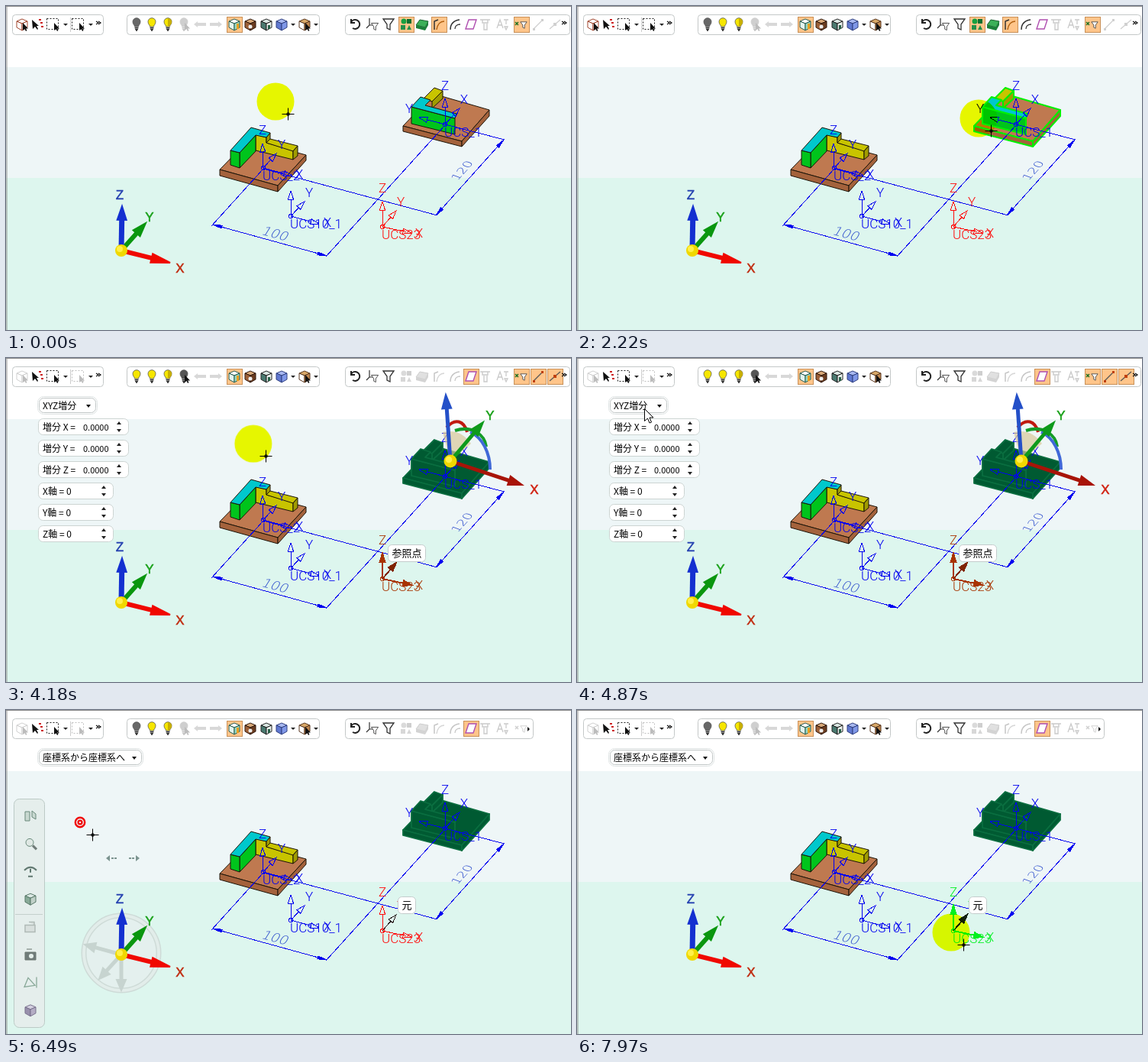
Write an HTML page that moves like this. It is 740x424 px and loops after 8000 ms.

```html
<!DOCTYPE html>
<html lang="ja">
<head>
<meta charset="utf-8">
<style>
html, body { margin: 0; width: 740px; height: 424px; overflow: hidden; background: #fff; }
svg { display: block; }
text { font-family: "Noto Sans CJK JP", "Noto Sans CJK", "Noto Sans", sans-serif; font-size: 12px; white-space: pre; }
.cad text { font-family: Roboto, "Liberation Sans", sans-serif; font-size: 17px; font-weight: 300; stroke: none; }
.cad path, .cad circle { shape-rendering: crispEdges; }
.dim { font-family: "DejaVu Sans", sans-serif !important; }
.axis { font-family: "Liberation Sans", sans-serif; font-size: 17px; }
.off { filter: grayscale(1); opacity: .28; }
#pointer { mix-blend-mode: multiply; }
</style>
</head>
<body>
<svg width="740" height="424" viewBox="0 0 740 424">
  <rect width="740" height="424" fill="#fff"/>
  <rect y="80" width="740" height="145" fill="#eef6f7"/>
  <rect y="225" width="740" height="199" fill="#ddf6ee"/>
  <path d="M0 .5H740M1 0V424" stroke="#8c8c8c" fill="none"/>
  <g id="tools"></g>
  <g id="compass"></g>
  <g id="parts"></g>
  <g id="dims" class="cad"></g>
  <g id="frames" class="cad"></g>
  <g id="origin" class="cad"></g>
  <g id="triad"></g>
  <g id="gizmo"></g>
  <g id="tip"></g>
  <g id="panel"></g>
  <g id="menu"></g>
  <circle id="pointer" r="24.5" fill="#f7ff00"/>
  <g id="ring" fill="none" stroke="#f00000" stroke-width="2.4"><circle r="6.2"/><circle r="2.4"/></g>
  <path id="cross" d="M8 16H24M16 8V24M14.5 14.5h3v3h-3z" fill="none" stroke="#000"/>
  <path id="arrow" d="M0 0V16L4 12.5L6.5 18.5L9 17.5L6.5 11.5H11.5Z" fill="#fff" stroke="#000"/>
</svg>
<script>
const LOOP = 8000, BLUE = '#0000f0';
const $ = id => document.getElementById(id);
const shown = {};
function put(id, html) {
  if (shown[id] !== html) $(id).innerHTML = shown[id] = html;
}

const path = (d, fill = 'none', stroke = 'none', w = 1) =>
  `<path d="${d}" fill="${fill}" stroke="${stroke}" stroke-width="${w}"/>`;
const box = (x, y, w, h, r, fill, stroke) =>
  `<rect x="${x + .5}" y="${y + .5}" width="${w}" height="${h}" rx="${r}" fill="${fill}" stroke="${stroke}"/>`;
const text = (x, y, s, extra = '') => `<text x="${x}" y="${y}" ${extra}>${s}</text>`;
const disc = (x, y, r, fill, stroke = 'none') =>
  `<circle cx="${x}" cy="${y}" r="${r}" fill="${fill}" stroke="${stroke}"/>`;

// Toolbar glyphs, drawn around their own centre
const mouse = path('M1 -2V8L3.5 6L5 9L6.5 8L5 5.5H8Z', '#111');
const cube = (top, left, right, line) =>
  path('M-7 -4L0 -7L7 -4L0 -1Z', top, line) + path('M-7 -4L0 -1V8L-7 4Z', left, line) + path('M7 -4L0 -1V8L7 4Z', right, line);
const bulb = c => path('M-2.5 3C-2.5 1 -5 0 -5 -3.5A5 4.8 0 0 1 5 -3.5C5 0 2.5 1 2.5 3Z', c, '#555', .8) + path('M-2.5 4.5H2.5M-2 6.5H2M-1 8H1', 'none', '#333', 1.3);
const dashed = '<rect x="-8.500" y="-7.500" width="15" height="14" fill="none" stroke="#222" stroke-dasharray="2 2"/>';
const funnel = path('M-7 -7H7L2 0V7L-2 5V0Z', '#fff', '#333', 1.3);
const drop = path('M-3 -1H3L0 2Z', '#222');
const more = path('M-3 -4L0 -2L-3 0M0 -4L3 -2L0 0', 'none', '#111', 1.2);
const curve = path('M-6 7C-6 -2 -1 -5 6 -6', 'none', '#333', 1.5);
const glyph = {
  pick: cube('#fff', '#fff', '#fff', '#a0442c') + mouse,
  points: path('M-7 -6L-6 6L-3 3L0 7L1 6L-1 2H2Z', '#111') + path('M2 -6h3M4 -2h3M5 3h3', 'none', '#c22', 2),
  region: dashed + mouse, drop, more,
  dark: bulb('#686868'), lit: bulb('#f6e600'), half: bulb('#f6e600') + path('M0 -8A5 5 0 0 1 5 -3C5 0 2 1 2 3H0Z', '#c9b000'),
  bulbPick: bulb('#555') + mouse,
  back: path('M-8 0L-3 -4V-2H8V2H-3V4Z', '#777'), next: path('M8 0L3 -4V-2H-8V2H3V4Z', '#777'),
  solid: cube('#fff', '#e4f5ee', '#9ad8c0', '#285c50') + path('M3 -1H6V6H3Z', '#e8a020'),
  brown: cube('#d8a878', '#9c6038', '#6a3c20', '#30180c') + disc(0, 3, 2.5, '#eee'),
  door: cube('#dce8e4', '#4a7a70', '#e8eeec', '#222') + path('M2 1H5V6H2Z', '#286048'),
  blue: cube('#a8b8f0', '#6078d0', '#8098e8', '#304080'),
  cubePick: cube('#d8a868', '#fff', '#c08850', '#5a3820') + mouse,
  redo: path('M-5 -3A6 6 0 1 1 -3 5M-5 -7V-2H0', 'none', '#222', 2),
  axes: path('M-4 -8V1H4M-4 1L-8 5', 'none', '#333', 1.2) + `<g transform="translate(3 3) scale(.65)">${funnel}</g>`,
  funnel,
  shapes: disc(-3, -4, 3.5, '#18a040') + path('M1 -7H7V-1H1Z', '#0c7030') + path('M-7 1H-1V7H-7ZM1 7L4 1L7 7Z', '#24904a'),
  face: path('M-8 1L-3 -6L8 -4L4 4Z', '#3cb058', '#1c6030') + path('M-8 1L4 4V8L-8 5ZM4 4L8 -4V1L4 8Z', '#1c803a'),
  edge: path('M-6 7V-4L-1 -6', 'none', '#333', 1.5) + path('M-3 7C-2 0 2 -4 7 -4', 'none', '#b06010', 1.5),
  curve: curve + path('M0 6C0 2 3 0 7 0', 'none', '#333', 1.3),
  plane: path('M-7 6L-3 -6H7L3 6Z', '#fff', '#b050b0', 1.4),
  filter: path('M-7 -6H6M-4 -6V-2H3V-6M-2 -1V7H2V-1', 'none', '#444', 1.4),
  letter: path('M-7 5L-3 -6L1 5M-5 1H-1M2 -6H8M5 -6V0M3 3H7L5 7Z', 'none', '#444', 1.3),
  pointX: path('M-8 -3L-4 1M-4 -3L-8 1', 'none', '#207020', 1.5) + `<g transform="translate(3 1) scale(.6)">${funnel}</g>`,
  line: path('M-6 6L6 -6', 'none', '#555', 1.3) + path('M-7 5h3v3h-3zM4 -7h3v3h-3z', '#c04010'),
  mid: path('M-7 6L7 -6', 'none', '#555', 1.3) + path('M-2 -2h4v4h-4z', '#c04010'),
  tail: path('M-1 -2L2 1L-1 4Z', '#111')
};
const icon = (name, x, mode = '') =>
  (mode === 'on' ? box(x - 10, 14, 20, 20, 0, '#ffc58a', '#c89058') : '') +
  `<g transform="translate(${x} 24)"${mode === 'off' ? ' class="off"' : ''}>${glyph[name]}</g>`;

function toolbar(s) {
  const bar = (x, w) => box(x, 11, w, 26, 4, '#fff', '#c4c8c8');
  const free = s < 3 ? '' : 'off', last = s === 4;
  const list = [
    ['pick', 21, free], ['points', 41], ['region', 62], ['drop', 78], ['region', 95, free], ['drop', 111], ['more', 121],
    [s === 3 ? 'lit' : 'dark', 171], ['lit', 191], ['half', 212], ['bulbPick', 233, s > 0 && s < 4 ? '' : 'off'],
    ['back', 254, 'off'], ['next', 275, 'off'], ['solid', 299, 'on'], ['brown', 320], ['door', 341], ['blue', 361],
    ['drop', 376], ['cubePick', 391], ['drop', 406],
    ['redo', 457], ['axes', 480], ['funnel', 501], ['shapes', 524, s < 3 ? 'on' : 'off'], ['face', 545, s < 2 ? '' : 'off'],
    ['edge', 567, s < 3 ? 'on' : 'off'], ['curve', 588, free], ['plane', 609, s < 3 ? '' : 'on'],
    ['filter', 628, 'off'], ['letter', 650, 'off'], ['pointX', 675, last ? 'off' : 'on']
  ];
  if (last) list.push(['tail', 684]);
  else list.push(['line', 697, s === 3 ? 'on' : 'off'], ['mid', 719, s === 3 ? 'on' : 'off'], ['more', 731]);
  return bar(8, 119) + bar(158, 252) + bar(444, last ? 246 : 294) +
    path('M84.500 15V34', 'none', '#ccc') + list.map(i => icon(...i)).join('');
}

// Each face: colour key and outline
const leftPart = [
  ['brown', 'M280 214L318 175L393 195L356 235Z'], ['dark', 'M280 214L356 235V243L280 222Z'], ['dark', 'M356 235L393 195V202L356 243Z'],
  ['yellow', 'M327 168L341 172V179L376 189V201L327 189Z'], ['yellow', 'M341 179L346 174L382 183L376 190Z'],
  ['olive', 'M376 190L382 183V196L376 201Z'], ['olive', 'M341 172L346 166V174L341 179Z'],
  ['green', 'M306 192L327 169V190L306 212Z'], ['green', 'M294 189L306 192V212L294 208Z'],
  ['cyan', 'M294 189L321 159L346 166L341 172L327 169L306 192Z']
];
const rightPart = [
  ['brown', 'M520 157L560 115L633 136L597 177Z'], ['dark', 'M520 157L597 177V184L520 164Z'], ['dark', 'M597 177L633 136V144L597 184Z'],
  ['yellow', 'M547 121L561 107L572 111L558 125Z'], ['olive', 'M558 125L572 111V121L558 134Z'],
  ['green', 'M531 132L588 147V168L531 154Z'],
  ['cyan', 'M531 132L543 119L556 123L549 130L590 141L588 147Z']
];
const natural = { brown: '#bf7950', dark: '#a4623c', yellow: '#c8c400', olive: '#a09c00', green: '#00c41c', cyan: '#00c8cc' };
const looks = { plain: [null, '#1c1408', 1], hover: [null, '#00f000', 2], picked: ['#902a00', '#b4420c', 1.8], chosen: ['#005a32', '#0a6e40', 1.8] };
function part(faces, look) {
  const [fill, line, w] = looks[look];
  return `<g stroke-linejoin="round">${faces.map(([key, d]) => path(d, fill || natural[key], line, w)).join('')}</g>`;
}

// Solid or open arrow from a to b
function arrow([ax, ay], [bx, by], color, shaft, head, half, fill = color) {
  const len = Math.hypot(bx - ax, by - ay), ux = (bx - ax) / len, uy = (by - ay) / len;
  const mx = bx - ux * head, my = by - uy * head;
  return path(`M${ax} ${ay}L${mx} ${my}`, 'none', color, shaft) +
    path(`M${bx} ${by}L${mx - uy * half} ${my + ux * half}L${mx + uy * half} ${my - ux * half}Z`, fill, color, Math.min(shaft, 2));
}

function frame(o, tips, labels, name, color, w = 1, yColor = color) {
  const letters = labels.map(([s, x, y]) => text(x, y + 6, s, 'text-anchor="middle"')).join('');
  return `<g fill="${color}">` + tips.map((t, i) => arrow(o, t, i === 1 ? yColor : color, w, 11, 3.5, w > 1 ? undefined : 'none')).join('') +
    disc(o[0], o[1], 2.5, 'none', color) + letters + text(o[0] - 1, o[1] + 16, name) + '</g>';
}

put('dims', path('M337 213L269 288M575 156L419 328M337 213L565 274M575 155L653 175M271 286L420 327M563 274L652 175', 'none', BLUE) +
  [[271, 286, 149, 41], [420, 327, -149, -41], [563, 274, 89, -99], [652, 175, -89, 99]]
    .map(([x, y, dx, dy]) => arrow([x + dx / 8, y + dy / 8], [x, y], BLUE, 1, 12, 2)).join('') +
  '<g fill="#2c4ccc" text-anchor="middle">' +
  text(0, 0, '100', 'class="dim" style="font-size:18px" transform="matrix(.964 .265 -.5 .8 350 303)"') +
  text(0, 0, '120', 'class="dim" style="font-size:17px" transform="matrix(.67 -.74 .8 .3 602 217)"') + '</g>');

put('frames',
  frame([337, 212], [[336, 180], [354, 193], [375, 222]], [['Z', 336, 162], ['Y', 361, 181], ['X', 384, 220]], 'UCS_2', BLUE) +
  frame([373, 275], [[373, 242], [391, 256], [410, 285]], [['Y', 397, 244], ['X', 421, 283]], 'UCS10_1', BLUE) +
  frame([575, 155], [[575, 121], [594, 134], [541, 146]], [['Z', 575, 104], ['X', 600, 122], ['Y', 528, 134]], 'UCS_1', BLUE));

const ball = (x, y, r) => disc(x, y, r, '#f0d800') + disc(x - 2, y - 2, r / 2, '#fff04a');
const letter = (x, y, s, c) => text(x, y + 6, s, `class="axis" text-anchor="middle" fill="${c}" stroke="${c}" stroke-width=".5"`);
const solid = (a, b, c, w = 6, head = 18) => arrow(a, b, c, w, head, 6);
put('triad', solid([151, 320], [183, 284], '#0a960f') + solid([151, 320], [215, 336], '#f00800', 6, 25) +
  solid([151, 320], [152, 262], '#1430d0', 7) + ball(151, 320, 8) +
  letter(149, 247, 'Z', '#2440b0') + letter(188, 276, 'Y', '#18a018') + letter(228, 343, 'X', '#c02c10'));

const gizmo =
  path('M582 135L572 97Q595 92 609 112Z', '#d8c898b0') +
  path('M577 91C588 78 600 82 604 97', 'none', '#c01810', 4) + path('M588 95C610 88 627 100 629 116', 'none', '#149c28', 4) +
  path('M608 97C624 104 634 124 634 146', 'none', '#4068d8', 4) +
  solid([582, 135], [625, 84], '#0e9a1c', 5) + solid([582, 135], [676, 166], '#a81408', 5) +
  solid([582, 135], [576, 48], '#2450c8', 5) + ball(582, 135, 8.5) +
  letter(634, 75, 'Y', '#18a018') + letter(692, 172, 'X', '#d02010');

const sideIcons = [
  path('M-7 -5H-1V7H-7ZM2 -6L7 -2V5L2 2Z', '#c8d8d0', '#68887a'), disc(-1, -1, 5, '#dfe8e4', '#68887a') + path('M3 3L8 8', 'none', '#707c78', 3),
  path('M-8 -1Q0 -9 8 -1M0 -3V2M-3 7H3', 'none', '#607870', 2), cube('#dce8e4', '#88aa98', '#c0d0c8', '#587868'),
  path('M-7 -2H6V7H-7ZM-2 -6H5V-2', '#d8dfdd', '#b0bab6', 1.5), path('M-7 -3H7V7H-7ZM-5 -7H2', '#707c7a', '#68746f') + disc(1, 2, 3, '#e4eeea'),
  path('M-8 6L-3 -6L6 4ZM8 -7V7', 'none', '#88a898', 1.3), cube('#d4d0e0', '#9890ac', '#b4acc4', '#78708c')
];
put('compass', box(10, 116, 40, 299, 7, '#e5eeec', '#bccac6') +
  path('M12 267.500H48', 'none', '#c4d0cc') +
  sideIcons.map((s, i) => `<g transform="translate(32 ${138 + i * 36.4})">${s}</g>`).join('') +
  path('M131 194L136 190V198ZM138 193h3v2h-3zM142 193h3v2h-3zM175 194L170 190V198ZM165 193h3v2h-3zM161 193h3v2h-3z', '#7c9490') +
  '<g opacity=".85">' + `<circle cx="151" cy="318" r="49" fill="#e6f0ee" stroke="#ccd7d4" stroke-width="7"/>` +
  '<circle cx="151" cy="318" r="49" fill="none" stroke="#e4ecea" stroke-width="4"/>' +
  [[103, 307], [151, 367], [122, 352]].map(p => solid([151, 320], p, '#c4cfcb', 5, 14)).join('') + '</g>');

const combo = (w, s) => box(41, 50, w + 2, 23, 8, '#fff', '#dde2e2') + box(43, 52, w - 2, 19, 6, '#fff', '#c0c6c6') +
  text(48, 67, s) + path(`M${w + 29} 61h6l-3 4z`, '#111');
const spinner = (x, y) => path(`M${x - 3} ${y - 3}h6l-3 -4zM${x - 3} ${y + 3}h6l-3 4z`, '#222');
const shift = combo(76, 'XYZ増分') + ['X', 'Y', 'Z'].map((a, i) => {
  const y = 90 + i * 28;
  return box(42, y - 11, 118, 21, 6, '#fff', '#ccd4d2') + text(48, y + 5, `増分 ${a} =`) + text(101, y + 5, '0.0000', 'style="font-size:11px"') + spinner(148, y) +
    box(42, y + 73, 98, 21, 6, '#fff', '#ccd4d2') + text(48, y + 89, `${a}軸 = 0`) + spinner(128, y + 84);
}).join('');

const choices = ['点から点へ', 'XYZ増分', 'ﾍﾞｸﾄﾙに沿って', '座標系から座標系へ'];
const menu = hot => box(53, 75, 189, 94, 0, '#00000030', 'none') + box(49, 72, 190, 94, 0, '#f2f2f2', '#9a9a9a') +
  (hot >= 0 ? `<rect x="51" y="${75 + hot * 22}" width="188" height="22" fill="#8cd2f0"/>` : '') +
  '<rect x="52" y="97" width="22" height="22" fill="#90c8f0"/>' + disc(63, 108, 3, '#10203c') +
  choices.map((s, i) => text(84, 90 + i * 22, s, 'style="font-size:11.500px"')).join('');

const tip = (x, w, s) => box(x, 244, w, 22, 5, '#fff', '#c4cccc') + text(x + w / 2 + .5, 260, s, 'text-anchor="middle" style="font-size:13px"');

// time, x, y, easing of the stretch that ends here
const hold = () => 0, linear = p => p, accel = p => p * p, smooth = p => p * p * (3 - 2 * p);
const route = [
  [0, 353, 125, hold], [1030, 353, 125, hold], [1530, 421, 126, p => p ** 1.4], [1830, 536, 156, linear], [1960, 536, 156, hold],
  [2060, 526, 147, linear], [2220, 526, 147, hold], [2500, 527.5, 148.5, smooth], [3380, 420, 131, hold], [3900, 420, 131, hold],
  [4690, 88, 66, smooth], [4950, 88, 66, hold], [5510, 97, 147, smooth], [7140, 97, 148, hold], [7430, 97, 148, hold], [7970, 490, 291, smooth], [LOOP, 490, 291, hold]
];
function place(t) {
  const i = Math.max(1, route.findIndex(r => r[0] > t));
  const [t0, x0, y0] = route[i - 1], [t1, x1, y1, ease] = route[i];
  const p = ease((t - t0) / (t1 - t0));
  return [x0 + (x1 - x0) * p, y0 + (y1 - y0) * p];
}

const within = (t, spans) => spans.some(([a, b]) => t >= a && t < b);
const ramp = (t, a, b) => Math.min(1, Math.max(0, (t - a) / (b - a)));
const show = (id, on) => $(id).style.display = on ? '' : 'none';

function draw(t) {
  const [x, y] = place(t);
  const moving = t >= 3670 && t < 6090, toFrame = t >= 6090;
  put('tools', toolbar(toFrame ? 4 : moving ? 3 : t >= 2920 ? 2 : t >= 2520 ? 1 : 0));
  put('parts', part(leftPart, 'plain') + part(rightPart, t >= 3670 ? 'chosen' : t >= 2520 ? 'picked' : t >= 1740 ? 'hover' : 'plain'));

  const [color, w, yColor] = moving ? ['#a83400', 2, '#802400'] : t >= 7890 ? ['#00f020', 2, '#102010'] : ['#ff0808', 1, toFrame ? '#201010' : '#ff0808'];
  put('origin', frame([493, 289], [[493, 256], [511, 268], [531, 297]], [['Z', 493, 238], ['Y', 517, 256], ['X', 541, 297]], 'UCS23', color, w, yColor));
  put('gizmo', moving ? gizmo : '');
  put('tip', moving ? tip(500, 49, '参照点') : toFrame ? tip(513, 23, '元') : '');
  put('panel', moving ? shift : toFrame ? combo(136, choices[3]) : '');
  put('menu', within(t, [[4930, 6090]]) ? menu(y < 75 ? -1 : Math.min(3, Math.floor((y - 75) / 22))) : '');

  const side = Math.min(ramp(t, 4360, 4460), 1 - ramp(t, 4520, 4600)) + Math.min(ramp(t, 6120, 6450), 1 - ramp(t, 7560, 7760));
  $('compass').style.opacity = side;

  for (const id of ['pointer', 'ring', 'cross', 'arrow'])
    $(id).setAttribute('transform', id === 'pointer' || id === 'ring' ? `translate(${x} ${y})` : `translate(${Math.round(x) + .5} ${Math.round(y) + .5})`);
  show('ring', within(t, [[2520, 2920], [4720, 4870], [5620, 5730], [6280, 6720]]));
  show('pointer', within(t, [[0, 2520], [3080, 4720], [4960, 5620], [6120, 6280], [6980, LOOP]]));
  const overPanel = within(t, [[4500, 6090]]);
  show('arrow', overPanel);
  show('cross', !overPanel);
}

const start = performance.now();
function tick() {
  draw((performance.now() - start) % LOOP);
  requestAnimationFrame(tick);
}
tick();
</script>
</body>
</html>
```
